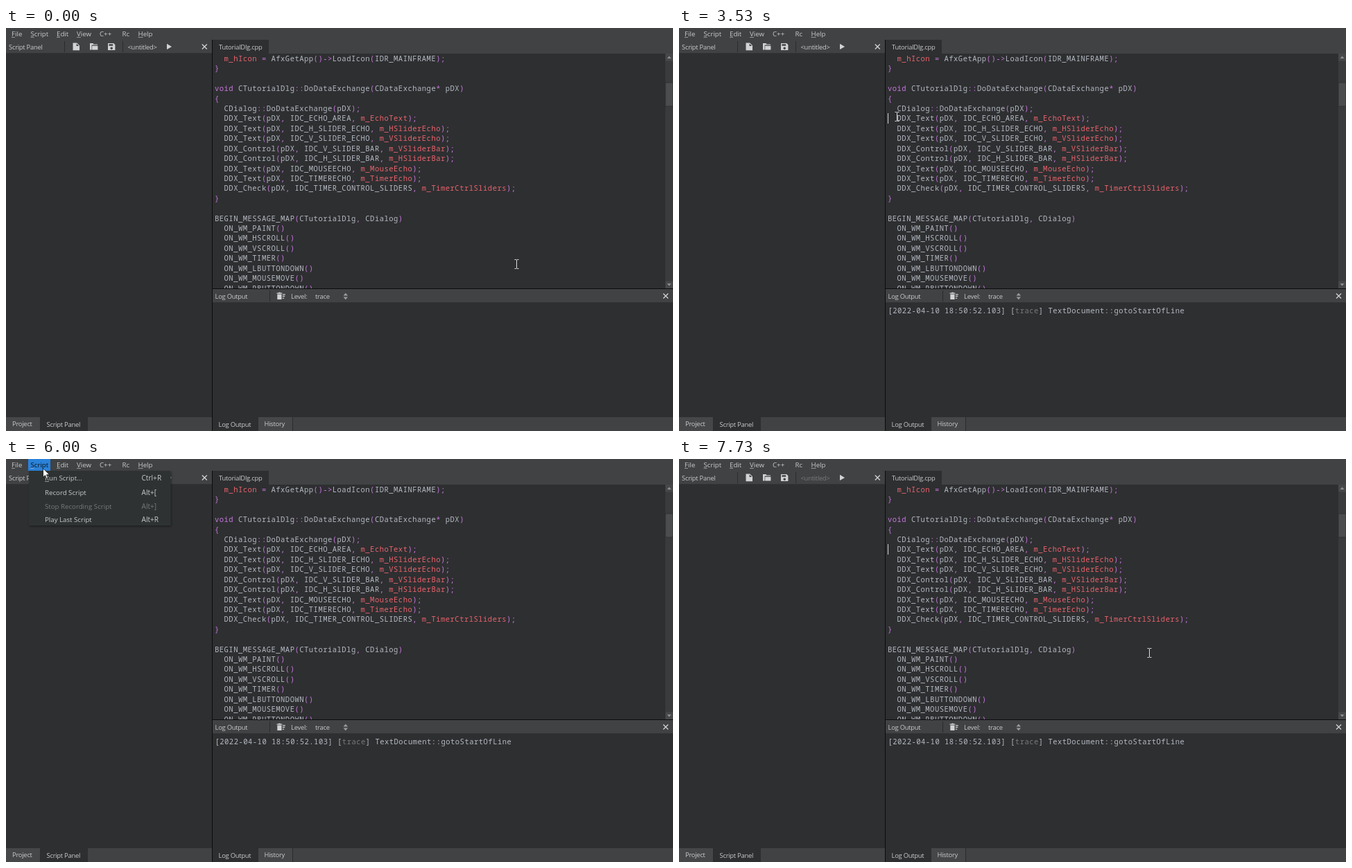
Recreate the animation shown at these times as an HTML page. Size 962 by 582 pixels, loop 8000 ms.

```html
<!DOCTYPE html>
<html lang="en">
<head>
<meta charset="utf-8">
<title>Script panel</title>
<style>
  html, body { margin: 0; width: 100%; height: 100%; overflow: hidden; background: #2e2f31; }
  svg { display: block; width: 962px; height: 582px; }
  text { white-space: pre; fill: #c9cacb; }
  .ui { font: 9.4px "Open Sans", "Noto Sans", sans-serif; letter-spacing: -.24px; }
  .menu { font: 9.7px "Open Sans", "Noto Sans", sans-serif; }
  .keys { font: 10.1px "Open Sans", "Noto Sans", sans-serif; }
  .code { font: 10.5px "Noto Sans Mono", "DejaVu Sans Mono", monospace; letter-spacing: .49px; fill: #b4b9c1; }
  .op { fill: #c678dd; }
  .member { fill: #e8636c; }
  .dim { fill: #77797b; }
  .lit { fill: #0b1118; }
  .bar { fill: #404243; }
  .dark { fill: #2e2f31; }
  .line { fill: #0c0c0d; }
  .hot { fill: #2a82da; }
  .icon { fill: #d2d3d4; }
  .cross { stroke: #d2d3d4; stroke-width: 1.3; }
  .sep { fill: #2b2c2d; }
</style>
</head>
<body>
<svg id="stage" viewBox="0 0 962 582" xmlns="http://www.w3.org/2000/svg"></svg>
<script>
const LOOP = 8000, TICK = 200 / 3;
const LINE = 14.42, ADVANCE = 6.79;

const rect = (x, y, w, h, cls, more = '') =>
  `<rect x="${x}" y="${y}" width="${w}" height="${h}" class="${cls}" ${more}/>`;
const label = (x, y, str, cls = 'ui', more = '') =>
  `<text x="${x}" y="${y}" class="${cls}" ${more}>${str}</text>`;
const path = (d, cls = 'icon', more = '') => `<path d="${d}" class="${cls}" ${more}/>`;
const safe = s => s.replace(/&/g, '&amp;').replace(/</g, '&lt;').replace(/>/g, '&gt;');
const cross = (x, y) => path(`M${x - 3.5} ${y - 3.5}l7 7m0 -7l-7 7`, 'cross');
const underline = (x, y, w, color = '#a9abac') =>
  `<rect x="${x}" y="${y}" width="${w}" height=".8" fill="${color}"/>`;

const source = [
  '  m_hIcon = AfxGetApp()->LoadIcon(IDR_MAINFRAME);',
  '}',
  '',
  'void CTutorialDlg::DoDataExchange(CDataExchange* pDX)',
  '{',
  '  CDialog::DoDataExchange(pDX);',
  '  DDX_Text(pDX, IDC_ECHO_AREA, m_EchoText);',
  '  DDX_Text(pDX, IDC_H_SLIDER_ECHO, m_HSliderEcho);',
  '  DDX_Text(pDX, IDC_V_SLIDER_ECHO, m_VSliderEcho);',
  '  DDX_Control(pDX, IDC_V_SLIDER_BAR, m_VSliderBar);',
  '  DDX_Control(pDX, IDC_H_SLIDER_BAR, m_HSliderBar);',
  '  DDX_Text(pDX, IDC_MOUSEECHO, m_MouseEcho);',
  '  DDX_Text(pDX, IDC_TIMERECHO, m_TimerEcho);',
  '  DDX_Check(pDX, IDC_TIMER_CONTROL_SLIDERS, m_TimerCtrlSliders);',
  '}',
  '',
  'BEGIN_MESSAGE_MAP(CTutorialDlg, CDialog)',
  ...['PAINT', 'HSCROLL', 'VSCROLL', 'TIMER', 'LBUTTONDOWN', 'MOUSEMOVE', 'RBUTTONDOWN']
    .map(s => `  ON_WM_${s}()`)
];

function codeLine(str, i) {
  const body = str.trimStart();
  const x = 301 + (str.length - body.length) * ADVANCE;
  const html = body.replace(/\bm_\w+|\bvoid\b|[(){};,:=*>-]+/g, s =>
    `<tspan class="${s.startsWith('m_') ? 'member' : 'op'}">${safe(s)}</tspan>`);
  return label(x, 47.9 + i * LINE, html, 'code');
}

function menuBar() {
  const items = [['File', 8, 5], ['Script', 35.5, 5], ['Edit', 73, 5], ['View', 102, 6],
                 ['C++', 135, 0], ['Rc', 167.5, 0], ['Help', 190.5, 7]];
  return rect(0, 0, 962, 17, 'bar')
    + `<rect id="menuHot" x="32" y="0" width="32" height="17" class="hot"/>`
    + items.map(([s, x, w]) => label(x, 12, s, 'menu', s === 'Script' ? 'id="scriptItem"' : '')
      + (w ? underline(x, 13.2, w) : '')).join('');
}

function leftPanel() {
  return rect(0, 17, 297, 20, 'bar') + rect(0, 36.3, 297, .7, 'sep')
    + `<rect id="toolHot" y="17" width="20" height="19.5" class="hot"/>`
    + label(4, 30.5, 'Script Panel')
    + rect(84, 19, 1, 16, 'sep') + rect(168, 19, 1, 16, 'sep')
    + path('M96.5 21.5h5.7l3.8 3.8v7h-9.5zM101.6 22.4v3.6h3.6z', 'icon', 'id="newIcon" fill-rule="evenodd"')
    + path('M121 22h4.4l1.2 1.4h5.4v1.2h-8.4v6.8h-2.6zM124.2 25.7h8.2v5.7h-8.2z')
    + path('M147 22h8.2l2.2 2.2v7.9h-10.4zM148.4 23.3v2.4h5.8v-2.4zM152.2 27.4a1.8 1.8 0 1 0 .01 0z', 'icon', 'fill-rule="evenodd"')
    + label(175.5, 30.5, '&lt;untitled&gt;', 'ui', 'id="untitled"')
    + path('M232 22.7l7 4.2l-7 4.2z')
    + cross(286.3, 27)
    + rect(0, 562, 297, 20, 'bar') + rect(0, 562, 49, 20, '', 'fill="#454748"')
    + rect(49, 562, 1, 20, 'sep') + rect(50, 561, 68, 21, 'dark')
    + label(9, 575.4, 'Project') + label(58.5, 576.4, 'Script Panel');
}

function editor() {
  return rect(298, 17, 664, 20, 'bar') + rect(298, 17, 81, 20, 'dark')
    + label(307, 30.7, 'TutorialDlg.cpp')
    + `<g clip-path="url(#view)">${source.map(codeLine).join('')}</g>`
    + rect(951, 37, 11, 339, '', 'fill="#393b3c"')
    + rect(951, 37, 11, 10.5, '', 'fill="#464849"') + rect(951, 365.5, 11, 10.5, '', 'fill="#464849"')
    + rect(951, 79, 11, 34, '', 'fill="#4b4d4e" stroke="#2a2b2c" stroke-width=".7"')
    + path('M953.5 44l3-3.4l3 3.4z', '', 'fill="#8d8f90"')
    + path('M953.5 369l3 3.4l3 -3.4z', '', 'fill="#8d8f90"')
    + `<rect id="caret" y="123" width="1" height="15" fill="#d4d6d8"/>`;
}

function logPanel() {
  return rect(298, 377, 664, 20, 'bar') + rect(298, 396.3, 664, .7, 'sep')
    + label(301.5, 390.7, 'Log Output') + rect(380, 379, 1, 16, 'sep')
    + path('M390.5 382.6h2.2l.7 -.8h2.2l.7 .8h2v1.2h-7.8zM391.3 384.6h6.2v7.4h-6.2zM398.8 384.2h4v1.3h-4zM398.8 386.8h3.4v1.3h-3.4zM398.8 389.4h2.4v1.3h-2.4z')
    + label(411, 390.7, 'Level:') + label(446, 390.7, 'trace')
    + path('M486.5 386.5l3.3-3.7l3.3 3.7zM486.5 388.6l3.3 3.7l3.3-3.7z', '', 'fill="#9b9d9e"')
    + cross(951.5, 387)
    + label(301.5, 411.6, '[2022-04-10 18:50:52.103] [<tspan class="dim">trace</tspan>] TextDocument::gotoStartOfLine', 'code', 'id="log"')
    + rect(298, 562, 664, 20, 'bar') + rect(298, 561, 66, 21, 'dark')
    + rect(364, 562, 49, 20, '', 'fill="#454748"') + rect(413, 562, 1, 20, 'sep')
    + label(306.5, 576.4, 'Log Output') + label(372.5, 575.4, 'History');
}

const entries = [['Run Script...', 'Ctrl+R', 30.6], ['Record Script', 'Alt+[', 51.6],
                 ['Stop Recording Script', 'Alt+]', 71.6], ['Play Last Script', 'Alt+R', 90.8]];

function popup() {
  return `<g id="popup"><rect x="33" y="17" width="204.5" height="79" fill="#2f3132" filter="url(#shadow)"/>`
    + `<rect id="rowHot" x="32.5" width="204" height="19.5" fill="#2a82da" stroke="#1d5b99"/>`
    + entries.map(([name, keys, y]) =>
        `<g class="entry">${label(56, y, name, 'menu')}${label(195.5, y, keys, 'keys')}</g>`).join('')
    + underline(56, 32, 6) + '</g>';
}

const $ = id => document.getElementById(id);
$('stage').innerHTML = `<defs>
    <clipPath id="view"><rect x="298" y="37" width="653" height="339"/></clipPath>
    <filter id="shadow" x="-10%" y="-10%" width="120%" height="130%">
      <feDropShadow dx="1" dy="1.5" stdDeviation="1.5" flood-color="#000" flood-opacity=".4"/>
    </filter></defs>`
  + rect(0, 0, 962, 582, 'dark') + menuBar() + leftPanel() + editor() + logPanel()
  + rect(297, 17, 1, 565, 'line') + rect(298, 376, 664, 1, 'line')
  + popup()
  + path('M-3 -6.5h2.3l.7 .6l.7 -.6h2.3M0 -6V6M-3 6.5h2.3l.7 -.6l.7 .6h2.3', '', 'id="beam" fill="none" stroke="#dcdddd" stroke-width="1"')
  + path('M.5 .6V13.2L3.4 10.5L5.3 15.2L7.4 14.3L5.5 9.8H9.6z', '', 'id="arrow" fill="#fff" stroke="#111" stroke-width=".8" stroke-linejoin="round"');

const rows = [...document.querySelectorAll('.entry')];

// Pointer stops: tick, x, y
const stops = [
  [0, 736, 341], [3, 736, 341], [11, 407, 186], [15, 407, 186], [21, 291, 104],
  [22, 289, 104], [25, 302, 125], [27, 302, 125], [31, 314, 128], [63, 314, 128],
  [70, 100, 27], [71, 98, 26], [72, 97, 25], [76, 60, 10], [80, 52, 7], [88, 52, 7],
  [96, 58, 44], [99, 58, 44], [108, 678, 280], [120, 678, 280]
];
const blinks = [[36, 43], [51, 59], [67, 75], [100, 108], [116, 120]];
const buttons = [91, 117, 142, 225];

function pointer(n) {
  const i = stops.findIndex(s => s[0] >= n);
  if (i < 1) return stops[0].slice(1);
  const [a, x0, y0] = stops[i - 1], [b, x1, y1] = stops[i];
  const u = (n - a) / (b - a), e = u * u * (3 - 2 * u);
  return [x0 + (x1 - x0) * e, y0 + (y1 - y0) * e].map(Math.round);
}

const show = (id, on) => { $(id).style.display = on ? '' : 'none'; };

function draw(t) {
  const n = Math.min(119, Math.floor((t + 4) / TICK));
  const [x, y] = pointer(n);
  const open = n >= 82 && n < 100;

  const overText = x >= 285 && y > 37;
  show('beam', overText);
  show('arrow', !overText);
  $('beam').setAttribute('transform', `translate(${x + .5} ${y})`);
  $('arrow').setAttribute('transform', `translate(${x} ${y})`);

  show('caret', blinks.some(([a, b]) => n >= a && n < b));
  $('caret').setAttribute('x', n < 53 ? 314.5 : 301);
  show('log', n >= 53);

  const tool = buttons.find(b => !open && y >= 17 && y < 37 && x >= b && x < b + 20);
  show('toolHot', tool !== undefined);
  if (tool !== undefined) $('toolHot').setAttribute('x', tool);
  $('newIcon').style.opacity = tool === 91 ? .6 : 1;
  $('untitled').classList.toggle('dim', n >= 100);

  show('menuHot', open);
  $('scriptItem').classList.toggle('lit', open);
  show('popup', open);
  $('popup').style.opacity = n === 82 ? .45 : 1;

  const row = !open || y < 17 ? -1 : y < 38 ? 0 : 1;
  show('rowHot', row >= 0);
  $('rowHot').setAttribute('y', row ? 38.5 : 17.5);
  rows.forEach((g, i) => g.querySelectorAll('text').forEach(s => {
    s.classList.toggle('lit', i === row);
    s.classList.toggle('dim', i === 2);
  }));
}

function frame() {
  draw(performance.now() % LOOP);
  requestAnimationFrame(frame);
}
frame();
</script>
</body>
</html>
```
